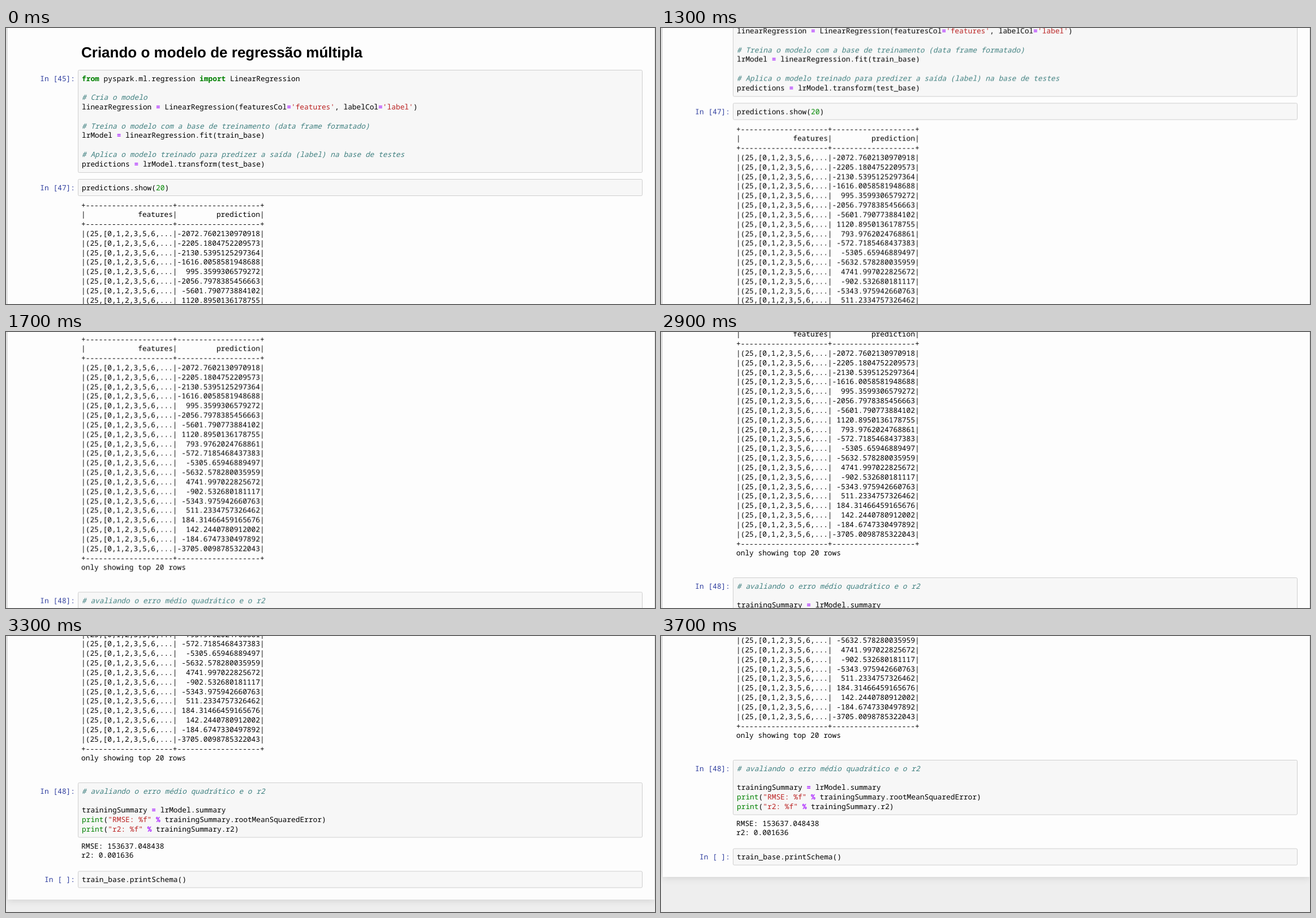
Write an HTML page that moves like this. It is 1147 px wide and 488 px high and loops after 4900 ms.

```html
<!DOCTYPE html>
<html lang="pt">
<head>
<meta charset="utf-8">
<title>Regressão múltipla</title>
<style>
html, body { margin: 0; width: 100%; height: 100%; overflow: hidden; background: #eee; }
#stage { position: relative; width: 1147px; height: 488px; overflow: hidden; background: #eee; }
#page {
  position: absolute; left: 3px; top: -40px; width: 1143px; height: 1007px;
  background: #fdfdfd; box-shadow: 0 0 12px 1px rgba(87, 87, 87, .2);
  animation: scroll 4.9s step-end infinite;
}
#sheet { position: absolute; left: -3px; top: 40px; overflow: visible; }
text {
  font: 12.85px "Noto Sans Mono", "DejaVu Sans Mono", monospace;
  white-space: pre; text-rendering: geometricPrecision;
}
.title { font: bold 26px "Liberation Sans", Arial, sans-serif; }
.prompt { fill: #303f9f; text-anchor: end; }
.box { fill: #f7f7f7; stroke: #cfcfcf; }
.keyword { fill: #008000; font-weight: bold; }
.builtin { fill: #008000; }
.number { fill: #080; }
.string { fill: #ba2121; }
.operator { fill: #a2f; font-weight: bold; }
.comment { fill: #408080; font-style: italic; }

/* Wheel scrolling, held for 100 ms per step */
@keyframes scroll {
  0% { transform: translateY(0); }
  18.36% { transform: translateY(-30.5px); }
  20.4% { transform: translateY(-95px); }
  22.44% { transform: translateY(-100px); }
  26.53% { transform: translateY(-134.5px); }
  28.57% { transform: translateY(-196.5px); }
  30.61% { transform: translateY(-220px); }
  32.65% { transform: translateY(-281px); }
  34.69% { transform: translateY(-300.5px); }
  59.18% { transform: translateY(-326px); }
  61.22% { transform: translateY(-396px); }
  63.26% { transform: translateY(-408px); }
  65.3% { transform: translateY(-480px); }
  67.34% { transform: translateY(-501px); }
  71.42% { transform: translateY(-515px); }
  73.46% { transform: translateY(-535px); }
  75.51%, 100% { transform: translateY(-541px); }
}
</style>
</head>
<body>
<div id="stage"><div id="page"><svg id="sheet" width="1147" height="967"></svg></div></div>
<script>
const LINE = 16.83;
const sheet = document.getElementById('sheet');

function add(parent, tag, attrs, content = '') {
  const node = document.createElementNS('http://www.w3.org/2000/svg', tag);
  for (const key in attrs) node.setAttribute(key, attrs[key]);
  node.textContent = content;
  return parent.appendChild(node);
}

const TOKENS = new RegExp([
  '(?<comment>#.*)',
  '(?<string>"[^"]*"|\'[^\']*\')',
  '(?<keyword>\\b(?:from|import)\\b)',
  '(?<builtin>\\bprint\\b)',
  '(?<number>\\b\\d+\\b)',
  '(?<operator>[=%])'
].join('|'), 'g');

function codeLine(source, x, y) {
  const text = add(sheet, 'text', { x, y });
  let end = 0;
  for (const match of source.matchAll(TOKENS)) {
    const kind = Object.keys(match.groups).find(name => match.groups[name]);
    text.append(source.slice(end, match.index));
    add(text, 'tspan', { class: kind }, match[0]);
    end = match.index + match[0].length;
  }
  text.append(source.slice(end));
}

function cell(label, top, height, lines) {
  const baseline = top + 19;
  add(sheet, 'rect', { class: 'box', x: 127.5, y: top, width: 997, height, rx: 2 });
  add(sheet, 'text', { class: 'prompt', x: 122, y: baseline }, `In [${label}]:`);
  lines.forEach((line, i) => codeLine(line, 134, baseline + i * LINE));
}

function output(y, lines) {
  lines.forEach((line, i) => add(sheet, 'text', { x: 133, y: y + i * LINE }, line));
}

add(sheet, 'text', { class: 'title', x: 133, y: 51.5 }, 'Criando o modelo de regressão múltipla');

cell('45', 74.5, 181, [
  'from pyspark.ml.regression import LinearRegression',
  '',
  '# Cria o modelo',
  "linearRegression = LinearRegression(featuresCol='features', labelCol='label')",
  '',
  '# Treina o modelo com a base de treinamento (data frame formatado)',
  'lrModel = linearRegression.fit(train_base)',
  '',
  '# Aplica o modelo treinado para predizer a saída (label) na base de testes',
  'predictions = lrModel.transform(test_base)'
]);

cell('47', 267.5, 29, ['predictions.show(20)']);

const predictions = `-2072.7602130970918 -2205.1804752209573 -2130.5395125297364
  -1616.0058581948688 995.3599306579272 -2056.7978385456663 -5601.790773884102
  1120.8950136178755 793.9762024768861 -572.7185468437383 -5305.65946889497
  -5632.578280035959 4741.997022825672 -902.532680181117 -5343.975942660763
  511.2334757326462 184.31466459165676 142.2440780912002 -184.6747330497892
  -3705.0098785322043`.split(/\s+/);
const row = (left, right) => `|${left.padStart(20)}|${right.padStart(19)}|`;
const rule = `+${'-'.repeat(20)}+${'-'.repeat(19)}+`;

output(317.5, [
  rule,
  row('features', 'prediction'),
  rule,
  ...predictions.map(value => row('(25,[0,1,2,3,5,6,...', value)),
  rule,
  'only showing top 20 rows'
]);

cell('48', 760.5, 96.5, [
  '# avaliando o erro médio quadrático e o r2',
  '',
  'trainingSummary = lrModel.summary',
  'print("RMSE: %f" % trainingSummary.rootMeanSquaredError)',
  'print("r2: %f" % trainingSummary.r2)'
]);
output(876.5, ['RMSE: 153637.048438', 'r2: 0.001636']);

cell(' ', 917, 29, ['train_base.printSchema()']);
</script>
</body>
</html>
```
